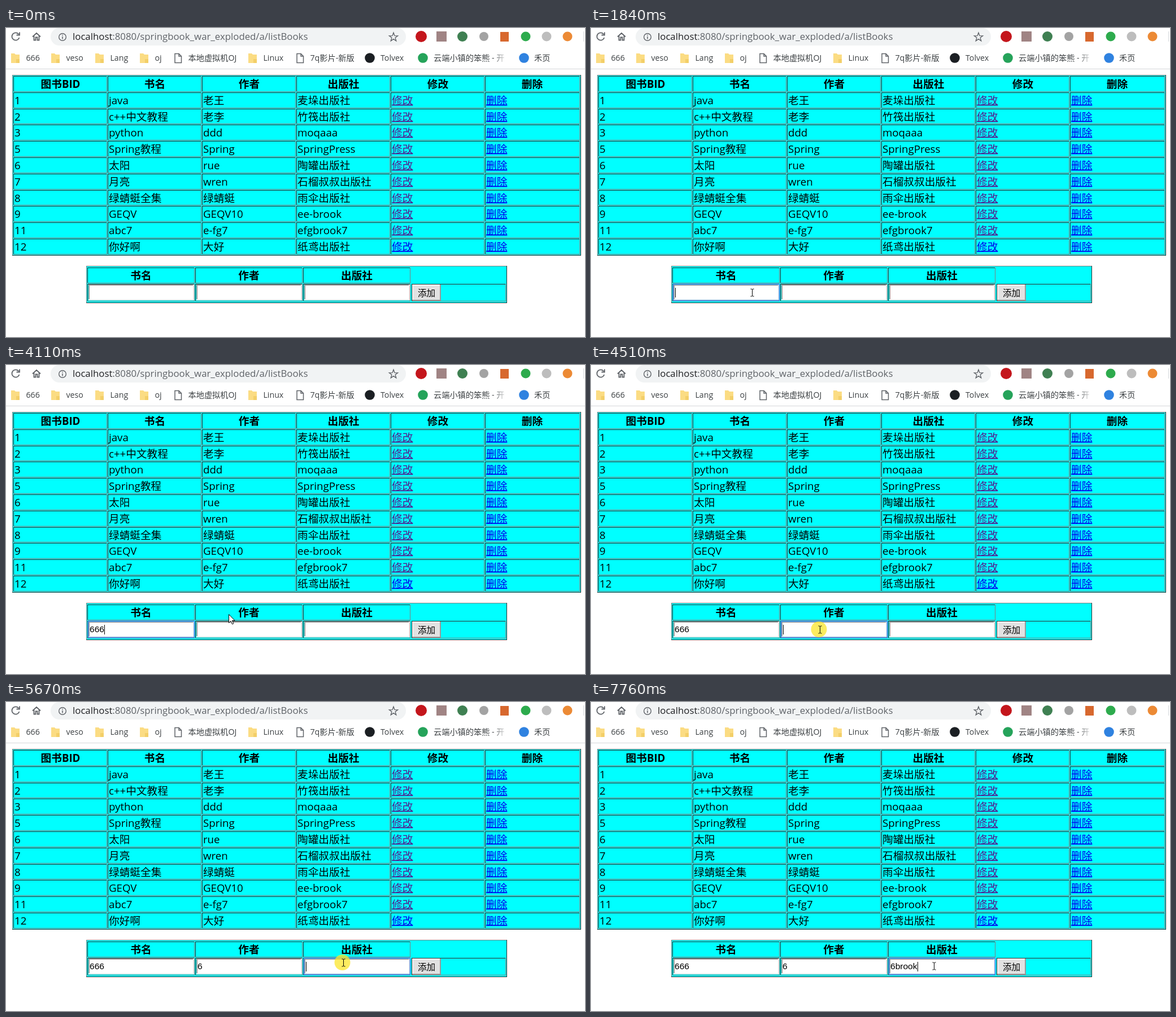
Animation of 1025 by 547 pixels, one loop 8000 ms. Source, as an HTML page:

```html
<!DOCTYPE html>
<html lang="zh-CN">
<head>
<meta charset="utf-8">
<title>listBooks</title>
<style>
  html, body { margin: 0; width: 100%; height: 100%; overflow: hidden; background: #fff; }
  svg { display: block; font: 18.67px "Open Sans", "Noto Sans CJK SC", "Noto Sans CJK JP", sans-serif; }
  .head { font-weight: bold; text-anchor: middle; }
  .link { text-decoration: underline; }
  .mark { font-size: 14.2px; fill: #3c4043; }
  .url { font-size: 16.8px; fill: #5f6368; }
  .button { font-size: 15.56px; text-anchor: middle; }
  .typed { font: 15.56px "Liberation Sans", Arial, sans-serif; }
</style>
</head>
<body>
<svg id="stage" width="1025" height="547" viewBox="0 0 1025 547"></svg>
<script>
const stage = document.getElementById('stage');

function add(tag, attrs, text) {
  const node = document.createElementNS('http://www.w3.org/2000/svg', tag);
  for (const key in attrs) node.setAttribute(key, attrs[key]);
  if (text) node.textContent = text;
  return stage.appendChild(node);
}
const rect = (x, y, width, height, fill, more) => add('rect', { x, y, width, height, fill, ...more });
const circle = (cx, cy, r, fill, more) => add('circle', { cx, cy, r, fill, ...more });
const label = (x, y, text, cls = '', fill) => add('text', { x, y, class: cls, ...(fill && { fill }) }, text);
const line = (d, color = '#5f6368', width = 1.6) =>
  add('path', { d, fill: 'none', stroke: color, 'stroke-width': width });

// Box with a two-tone border: lit from the top left, shaded at the bottom right.
function bevel(x, y, w, h, fill, topLeft, bottomRight, size = 1) {
  rect(x, y, w, h, bottomRight);
  rect(x, y, w - size, h - size, topLeft);
  rect(x + size, y + size, w - 2 * size, h - 2 * size, fill);
}
const CYAN = '#0ff', GRAY = '#808080', DARK = '#2c2c2c';
const table = (x, y, w, h) => bevel(x, y, w, h, CYAN, GRAY, DARK);
const cell = (x, y, w, h) => bevel(x, y, w, h, CYAN, DARK, GRAY);

function drawToolbar() {
  line('M22.5 11A6.7 6.7 0 1 0 23.5 17M24 7.5V12.5H18.5', '#5f6368', 1.8);
  line('M47 15.5L54 9L61 15.5M49.5 14V21.5H52.5V16.5H55.5V21.5H58.5V14', '#5f6368', 1.8);
  rect(79, 0, 629, 31, '#f1f3f4', { rx: 15.5 });
  circle(100, 16, 6.3, 'none', { stroke: '#5f6368', 'stroke-width': 1.4 });
  line('M100 12V13.6M100 15V19.5', '#5f6368', 1.5);
  label(118, 21, '', 'url').innerHTML =
    '<tspan fill="#202124">localhost</tspan>:8080/springbook_war_exploded/a/listBooks';
  let star = '';
  for (let i = 0; i < 10; i++) {
    const r = i % 2 ? 3.3 : 8, a = i * Math.PI / 5;
    star += (i ? 'L' : 'M') + (686 + r * Math.sin(a)) + ' ' + (16.3 - r * Math.cos(a));
  }
  line(star + 'Z', '#5f6368', 1.4);

  circle(735, 15, 10, '#c4161c');
  rect(762, 6, 18, 18, '#a08484');
  circle(808, 15, 9, '#3f8052');
  circle(846, 15, 8, '#a3a3a3');
  rect(875, 7, 15, 17, '#d7682e');
  circle(920, 15, 8.5, '#2dab4d');
  circle(957, 15, 8.5, '#bdbdbd');
  circle(994, 15, 8.5, '#ec8a35');
  rect(1022, 6, 1, 18, '#d5d8dc');

  const folders = [[9, '666'], [80, 'veso'], [158, 'Lang'], [237, 'oj'], [429, 'Linux']];
  for (const [x, name] of folders) {
    add('path', { d: `M${x} 45h6l2 2h7v15h-15z`, fill: '#fbdc83' });
    rect(x + 9, 55, 6, 7, '#f3cf69');
    label(x + 26.5, 58, name, 'mark');
  }
  for (const [x, name] of [[299, '本地虚拟机OJ'], [515, '7q影片-新版']]) {
    line(`M${x} 45.5h7l4.5 4.5v11.5h-11.5zM${x + 7} 45.5v4.5h4.5`, '#5f6368', 1.5);
    label(x + 23.5, 58, name, 'mark');
  }
  const sites = [[644, 663, 'Tolvex', '#1b1f23'], [738, 757, '云端小镇的笨熊 - 开', '#25a35a'],
                 [917, 935, '禾页', '#2f82e0']];
  for (const [cx, x, name, color] of sites) {
    circle(cx, 53, 8.8, color);
    label(x, 58, name, 'mark');
  }
  add('linearGradient', { id: 'fade' }).innerHTML =
    '<stop stop-color="#fff" stop-opacity="0"/><stop offset="1" stop-color="#fff"/>';
  rect(860, 42, 28, 24, 'url(#fade)');
  rect(888, 42, 16, 24, '#fff');
  rect(0, 72, 1025, 1, '#d4d6d9');
}

const books = [
  ['1', 'java', '老王', '麦垛出版社'],
  ['2', 'c++中文教程', '老李', '竹筏出版社'],
  ['3', 'python', 'ddd', 'moqaaa'],
  ['5', 'Spring教程', 'Spring', 'SpringPress'],
  ['6', '太阳', 'rue', '陶罐出版社'],
  ['7', '月亮', 'wren', '石榴叔叔出版社'],
  ['8', '绿蜻蜓全集', '绿蜻蜓', '雨伞出版社'],
  ['9', 'GEQV', 'GEQV10', 'ee-brook'],
  ['11', 'abc7', 'e-fg7', 'efgbrook7'],
  ['12', '你好啊', '大好', '纸鸢出版社'],
];

function drawBooks() {
  table(11, 83, 1007, 320);
  const rows = [['图书BID', '书名', '作者', '出版社', '修改', '删除'],
                ...books.map(book => [...book, '修改', '删除'])];
  rows.forEach((row, r) => {
    const y = Math.round(85 + 28.8 * r), next = Math.round(85 + 28.8 * (r + 1));
    row.forEach((text, c) => {
      const x = 13 + 167 * c;
      cell(x, y, c < 5 ? 166 : 168, next - y - 1);
      if (!r) return label(x + 83.5, y + 21, text, 'head');
      const color = c < 4 ? '#000' : c === 4 && r < 10 ? '#551a8b' : '#00e';
      label(x + 2, y + 20.5, text, c > 3 ? 'link' : '', color);
    });
  });
}

function drawForm() {
  table(142, 421, 745, 66);
  ['书名', '作者', '出版社'].forEach((text, i) => {
    const x = 144 + 191 * i;
    cell(x, 424, 190, 28);
    label(x + 95, 445, text, 'head');
    cell(x, 453, 190, 31);
    bevel(x + 2, 454, 187, 28, '#fff', '#9a9a9a', '#eee', 2);
  });
  cell(718, 453, 167, 31);
  bevel(719, 454, 51, 29, '#e2e2e2', '#f2f2f2', '#999', 2);
  label(744.5, 475, '添加', 'button');
}

drawToolbar();
drawBooks();
drawForm();

const ring = rect(0, 453.5, 188, 29, 'none', { rx: 1.5, stroke: '#3f8fe8', 'stroke-width': 2 });
const typed = [0, 1, 2].map(i => label(148 + 191 * i, 473, '', 'typed'));
const caret = rect(0, 460, 1, 17, '#000');
const glow = circle(0, 0, 14, '#fbe62b', { opacity: 0.75 });
const beam = line('M-3 -6.5H-1L0 -5.5L1 -6.5H3M0 -5.5V5.5M-3 6.5H-1L0 5.5L1 6.5H3', '#000', 1);
const arrow = add('path', { d: 'M.5 .5V15.5L4 12.2L6.4 17.8L8.8 16.8L6.4 11.3H11Z', fill: '#fff', stroke: '#000' });

// Each click: start, end of the highlight, field.
const clicks = [[760, 910, 0], [4510, 4580, 1], [5670, 5750, 2]];
const words = ['666', '6', '6brook'];
const keys = [[3320, 3490, 3640], [4900], [6060, 6760, 7070, 7300, 7530, 7680]];
// Pointer positions, each held until the next: time, x, y.
const pointer = [
  [70, 372, 517], [130, 317, 495], [300, 312, 489], [380, 301, 483], [450, 292, 474], [530, 287, 469],
  [600, 285, 468], [3960, 306, 463], [4040, 358, 445], [4110, 394, 441], [4180, 399, 449],
  [4260, 404, 463], [4340, 405, 468], [4980, 408, 468], [5210, 419, 474], [5290, 444, 483],
  [5360, 482, 483], [5440, 526, 478], [5520, 562, 471], [5590, 586, 463], [5670, 597, 461],
  [7760, 607, 467],
];
const show = (node, on) => node.setAttribute('visibility', on ? 'visible' : 'hidden');
const latest = (list, t) => list.filter(item => item[0] <= t).pop();

function draw(t) {
  keys.forEach((times, i) => {
    typed[i].textContent = words[i].slice(0, times.filter(k => k <= t).length);
  });

  const click = latest(clicks, t);
  show(ring, click);
  show(caret, false);
  if (click) {
    const field = click[2], text = typed[field];
    ring.setAttribute('x', 145.5 + 191 * field);
    const since = t - Math.max(click[0], ...keys[field].filter(k => k <= t));
    const width = text.textContent ? text.getComputedTextLength() : 1;
    caret.setAttribute('x', Math.round(148 + 191 * field + width));
    show(caret, Math.floor((since + 20) / 549.8) % 2 === 0);
  }

  const [, x, y] = latest(pointer, t) || [0, -50, -50];
  const overField = y > 454 && y < 482 && x > 145 && x < 716;
  show(beam, overField);
  show(arrow, !overField);
  beam.setAttribute('transform', `translate(${x + 0.5} ${y + 0.5})`);
  arrow.setAttribute('transform', `translate(${x} ${y})`);
  show(glow, click && t < click[1]);
  glow.setAttribute('cx', x - 1.5);
  glow.setAttribute('cy', y);
}

function frame() {
  draw(performance.now() % 8000);
  requestAnimationFrame(frame);
}
frame();
</script>
</body>
</html>
```
